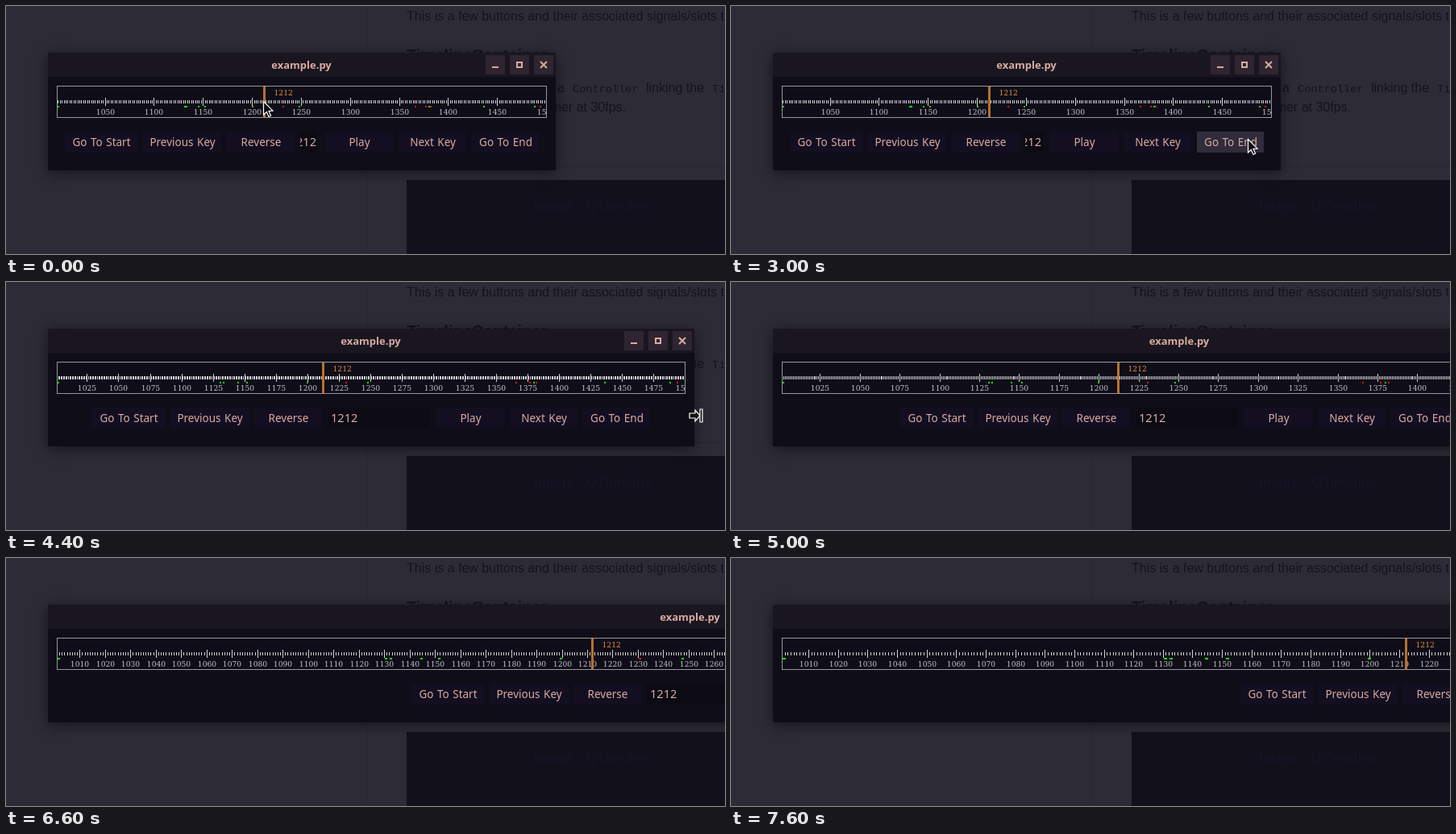
Recreate the animation shown at these times as an HTML page with a canvas. Size 892 px wide and 308 px high, loop 8000 ms.

```html
<!DOCTYPE html>
<html lang="en">
<head>
<meta charset="utf-8">
<title>Timeline window</title>
<style>
html, body { margin: 0; width: 100%; height: 100%; overflow: hidden; background: #2d2c36; }
canvas { display: block; }
</style>
</head>
<body>
<canvas id="stage" width="892" height="308"></canvas>
<script>
const ctx = document.getElementById('stage').getContext('2d');
const LOOP = 8000, STEP = 100;
const FIRST = 1001, LAST = 1500, NOW = 1212;
const LEFT = 52, TOP = 58, BOTTOM = 204, BOX = 63;
const UI = '13.5px "Noto Sans", "Open Sans", sans-serif';
const TICK_FONT = '9.2px "DejaVu Serif", serif';
const PINK = '#d9aaa2', GREEN = '#14e214', RED = '#d8161c';

// Keyframes: time, then values
const rightEdge = [[3600, 682], [4000, 750], [4400, 854], [5700, 1302],
  [6600, 1646], [7200, 1850], [7300, 1850], [7600, 1904]];
const pointer = [[200, 319, 118], [300, 314, 250], [400, 314, 250], [600, 419, 210],
  [700, 419, 210], [900, 476, 195], [1000, 476, 195], [1100, 422, 193], [1500, 664, 162],
  [1600, 682, 157], [1900, 682, 158], [2000, 667, 158], [2400, 667, 158], [2700, 440, 168],
  [3000, 641, 165], [3300, 682, 157], [3600, 682, 157], [4400, 856, 166]];

// Label, x, width in a window whose centre is at 453
const buttons = [['Go To Start', 107, 90], ['Previous Key', 204, 97], ['Reverse', 308, 84],
  ['Play', 534, 84], ['Next Key', 625, 84], ['Go To End', 716, 83]];
const keys = [
  [GREEN, [1001, 1130, 1132, 1144, 1151, 1199, 1247, 1379, 1435, 1487]],
  [RED, [1230, 1365, 1376, 1381, 1493]]];

function at(track, t) {
  const i = track.findIndex(k => k[0] > t);
  if (i < 0) return track[track.length - 1].slice(1);
  if (i === 0) return track[0].slice(1);
  const a = track[i - 1], b = track[i], p = (t - a[0]) / (b[0] - a[0]);
  return a.slice(1).map((v, j) => v + (b[j + 1] - v) * p);
}

function rect(color, x, y, w, h) {
  ctx.fillStyle = color;
  ctx.fillRect(x, y, w, h);
}

function text(str, x, y, font, color, align = 'left') {
  ctx.font = font;
  ctx.fillStyle = color;
  ctx.textAlign = align;
  ctx.fillText(str, x, y);
}

function clipped(x, y, w, h, draw) {
  ctx.save();
  ctx.beginPath();
  ctx.rect(x, y, w, h);
  ctx.clip();
  draw();
  ctx.restore();
}

function page() {
  const ink = '#15131e', sans = '16px "Liberation Sans", sans-serif';
  const mono = '13.6px "Liberation Mono", monospace';
  rect('#2d2c36', 0, 0, 892, 308);
  rect('#292832', 448, 0, 1, 308);
  text('This is a few buttons and their associated signals/slots that', 497, 18, sans, ink);
  text('TimelineContainer', 497, 68, 'bold 20px "Liberation Sans", sans-serif', ink);
  text('a', 684, 107, sans, ink);
  text('Controller', 703, 107, mono, ink);
  text('linking the', 794, 107, sans, ink);
  text('Timeline', 876, 107, mono, ink);
  text('timer at 30fps.', 769, 131, sans, ink, 'right');
  rect('#272630', 497, 199, 395, 1);
  rect('#12101a', 497, 216, 395, 92);
  const faint = 'bold 17px "Liberation Sans", sans-serif';
  text('Image', 655, 254, faint, '#151326');
  text('QTimeline', 720, 254, faint, '#151326');
}

function frameAndTitle(right) {
  ctx.save();
  ctx.shadowColor = 'rgba(0,0,0,.55)';
  ctx.shadowBlur = 16;
  ctx.shadowOffsetY = 3;
  rect('#0f0d18', LEFT, TOP, right - LEFT, BOTTOM - TOP);
  ctx.restore();
  rect('#19161f', LEFT, TOP, right - LEFT, 30);
  text('example.py', (LEFT + right) / 2 - .5, 78,
    'bold 13px "Noto Sans", "Open Sans", sans-serif', PINK, 'center');
  for (const d of [87, 57, 27]) rect('#2f2530', right - d, 61, 24, 24);
  rect(PINK, right - 79, 75, 8, 2);
  ctx.strokeStyle = PINK;
  ctx.lineWidth = 2;
  ctx.strokeRect(right - 48, 70, 6, 6);
  ctx.beginPath();
  ctx.moveTo(right - 19, 69); ctx.lineTo(right - 11, 77);
  ctx.moveTo(right - 11, 69); ctx.lineTo(right - 19, 77);
  ctx.stroke();
}

function timeline(width) {
  const scale = (width - 1) / (LAST - FIRST);
  const pos = f => BOX + .5 + (f - FIRST) * scale;
  const major = [10, 25, 50].find(n => n * scale > 31) || 50;
  const minor = major === 50 ? 2 : 1;
  clipped(BOX, 99, width, 40, () => {
    for (let f = FIRST + 1; f <= LAST; f++) {
      const x = Math.floor(pos(f));
      if (f % major === 0) {
        rect('#d2d0d4', x, 114, 1, 10);
        text(f, x + .5, 135, TICK_FONT, '#c6c3c9', 'center');
      } else if (f % minor === 0) {
        rect('#d2d0d4', x, 117, 1, 4);
      }
    }
    for (const [color, frames] of keys)
      for (const f of frames)
        rect(color, Math.round(pos(f) + .5), 124, Math.max(2, Math.round(scale)), 2);
    const head = Math.round(pos(NOW) - 1.3);
    rect('#b9712c', head, 99, 3, 40);
    text(NOW, head + 13.5, 111, TICK_FONT, '#e2923f');
  });
  ctx.strokeStyle = '#97959d';
  ctx.lineWidth = 1;
  ctx.strokeRect(BOX + .5, 99.5, width - 1, 39);
}

function controls(right, x, y) {
  const shift = Math.floor((LEFT + right) / 2 - 453);
  const squeeze = Math.max(0, Math.round((694 - (right - 92)) / 2));
  ctx.wordSpacing = '1px';
  buttons.forEach(([label, bx, w], i) => {
    const left = bx + shift + (i < 3 ? squeeze : -squeeze);
    const over = x >= left && x < left + w && y >= 156 && y < 182;
    rect(over ? '#302c3c' : '#130f21', left, 156, w, 26);
    text(label, left + w / 2 + .5, 174, UI, PINK, 'center');
  });
  ctx.wordSpacing = '0px';
  const from = 400 + shift + squeeze, to = 524 + shift - squeeze;
  rect('#0c0a13', from - 1, 156, to - from + 2, 26);
  clipped(from - 1, 156, to - from + 2, 26, () => {
    const font = UI.replace('13.5', '14.6');
    if (squeeze > 40) text(NOW, to - 1, 174, font, PINK, 'right');
    else text(NOW, from + 3, 174, font, PINK);
  });
}

function shape(points, x, y, fill, line) {
  ctx.beginPath();
  for (let i = 0; i < points.length; i += 2) ctx.lineTo(x + points[i], y + points[i + 1]);
  ctx.closePath();
  ctx.fillStyle = fill;
  ctx.fill();
  ctx.strokeStyle = line;
  ctx.lineWidth = 1.2;
  ctx.stroke();
}

function cursor(x, y, right) {
  x = Math.round(x);
  y = Math.round(y);
  if (Math.abs(x - right) < 12 && y > TOP && y < BOTTOM) {
    shape([-8, -3, -1, -3, -1, -7, 5, 0, -1, 7, -1, 3, -8, 3], x, y, '#111', '#fff');
    shape([5, -8, 8, -8, 8, 8, 5, 8], x, y, '#111', '#fff');
  } else {
    shape([.5, .5, .5, 17, 4.3, 13.4, 7, 19.5, 9.6, 18.3, 7, 12.5, 12, 12.2],
      x, y, '#0b0b0d', '#fff');
  }
}

function draw(now) {
  const t = Math.floor(now % LOOP / STEP) * STEP;
  const right = Math.round(at(rightEdge, t)[0]);
  let [x, y] = at(pointer, t);
  if (t > 3600) x = right + 2;
  page();
  frameAndTitle(right);
  timeline(right - 11 - BOX);
  controls(right, x, y);
  cursor(x, y, right);
}

const start = performance.now();
function tick() {
  draw(performance.now() - start);
  requestAnimationFrame(tick);
}
tick();
</script>
</body>
</html>
```
